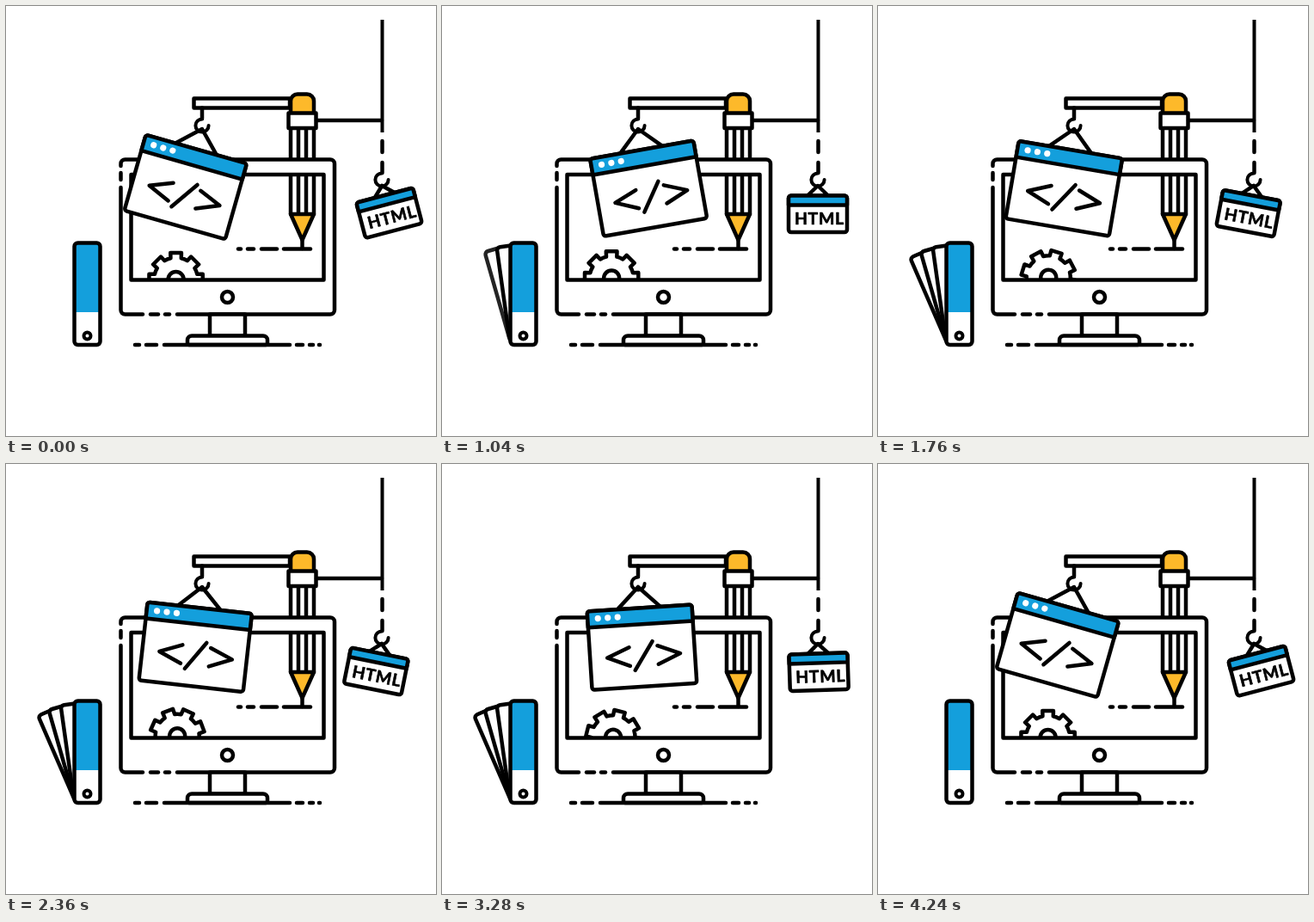
An HTML page with a canvas for the animation above (4.28 s loop, 500 px wide and 500 px high).

```html
<!DOCTYPE html>
<html lang="en">
<head>
<meta charset="utf-8">
<title>Web design crane</title>
<style>
html, body { margin: 0; width: 100%; height: 100%; overflow: hidden; background: #fff; }
canvas { display: block; width: 500px; height: 500px; }
</style>
</head>
<body>
<canvas id="stage" width="500" height="500"></canvas>
<script>
const ctx = document.getElementById('stage').getContext('2d');
const LOOP = 4280, STEP = 40;
const BLUE = '#149fdc', YELLOW = '#fdb92a', WHITE = '#fff', INK = '#000';
const WEIGHT = 4.5;
const RAD = Math.PI / 180;

const clamp = v => Math.max(0, Math.min(1, v));
const ramp = (t, a, b) => clamp((t - a) / (b - a));
const mix = (a, b, u) => a + (b - a) * u;
const soft = (u, k) => u - k * Math.sin(2 * Math.PI * u) / (2 * Math.PI);

function paint(fill, width = WEIGHT) {
  if (fill) { ctx.fillStyle = fill; ctx.fill(); }
  if (width) { ctx.lineWidth = width; ctx.stroke(); }
}

function line(...p) {
  ctx.beginPath();
  for (let i = 0; i < p.length; i += 2) ctx.lineTo(p[i], p[i + 1]);
  paint(null);
}

function box(x1, y1, x2, y2, r, fill, width) {
  ctx.beginPath();
  ctx.roundRect(x1, y1, x2 - x1, y2 - y1, r);
  paint(fill, width);
}

function disc(x, y, r, fill, width) {
  ctx.beginPath();
  ctx.arc(x, y, r, 0, 2 * Math.PI);
  paint(fill, width);
}

// Horizontal dashes given as start/end pairs
function dashes(y, ...x) {
  for (let i = 0; i < x.length; i += 2) line(x[i], y, x[i + 1], y);
}

function turned(x, y, deg, draw) {
  ctx.save();
  ctx.translate(x, y);
  ctx.rotate(deg * RAD);
  draw();
  ctx.restore();
}

function hook(x, y) {
  ctx.beginPath();
  ctx.arc(x, y, 7.6, -90 * RAD, 0, true);
  paint(null, 4);
}

function pencil() {
  box(331, 102.5, 358, 126, [8, 8, 0, 0], YELLOW);
  for (const x of [331, 340, 349, 358]) line(x, 142, x, 242);
  box(328.5, 124.5, 360.5, 142, 0, WHITE);
  ctx.beginPath();
  ctx.moveTo(331, 242);
  ctx.lineTo(358, 242);
  ctx.lineTo(344.5, 272);
  ctx.closePath();
  paint(YELLOW);
  line(344.5, 272, 344.5, 282);
  dashes(282.5, 270, 273, 281, 288, 297, 315, 323, 354);
}

function gear(a) {
  const b = (a + 120) * RAD;
  ctx.save();
  ctx.beginPath();
  ctx.rect(147, 198, 221, 120);
  ctx.clip();
  turned(198.2 + 1.2 * Math.cos(b), 317 + 1.2 * Math.sin(b), a, () => {
    ctx.beginPath();
    for (let i = 0; i < 8; i++) {
      const c = i * 45 - 90;
      for (const [d, r] of [[-14, 25.5], [-11.5, 31.8], [11.5, 31.8], [14, 25.5]]) {
        ctx.lineTo(r * Math.cos((c + d) * RAD), r * Math.sin((c + d) * RAD));
      }
      ctx.arc(0, 0, 25.5, (c + 14) * RAD, (c + 31) * RAD);
    }
    ctx.closePath();
    paint(WHITE);
    disc(0, 0, 9, WHITE);
  });
  ctx.restore();
}

function bezel() {
  ctx.beginPath();
  ctx.roundRect(133.5, 178.5, 248.5, 180, 5);
  ctx.rect(145.5, 196, 224, 122.5);
  ctx.fillStyle = WHITE;
  ctx.fill('evenodd');

  ctx.beginPath();
  ctx.moveTo(133.5, 186);
  ctx.arcTo(133.5, 178.5, 140, 178.5, 5);
  ctx.arcTo(382, 178.5, 382, 200, 5);
  ctx.arcTo(382, 358.5, 370, 358.5, 5);
  ctx.lineTo(199, 358.5);
  ctx.moveTo(133.5, 194);
  ctx.lineTo(133.5, 202);
  ctx.moveTo(133.5, 211);
  ctx.arcTo(133.5, 358.5, 145, 358.5, 5);
  ctx.lineTo(159, 358.5);
  paint(null);
  dashes(358.5, 168, 177, 185, 190);

  box(145.5, 196, 369.5, 318.5, 0, null);
  disc(257.5, 338.5, 6.5, WHITE);
}

function stand() {
  box(237, 358.5, 278, 383.5, 0, WHITE);
  box(211, 383.5, 304, 394, [5, 5, 2, 2], WHITE);
  dashes(394, 150, 155, 163, 175, 184, 330, 338, 345, 353, 357, 364, 365);
}

function crane() {
  box(218.5, 107.5, 330, 118.5, 0, WHITE);
  line(228, 118.5, 228, 131);
  ctx.lineCap = 'butt';
  ctx.beginPath();
  ctx.moveTo(437.5, 16);
  ctx.lineTo(437.5, 147);
  paint(null, 4);
  ctx.lineCap = 'round';
  line(361, 133, 437, 133);
  line(437.5, 157, 437.5, 170);
  line(437.5, 182, 437.5, 194);
}

function codeWindow(deg) {
  turned(228, 143, deg, () => {
    line(-26, 25, 0, 0, 25, 25);
    box(-61, 24.5, 61, 116, 3, WHITE);
    box(-61, 24.5, 61, 43.5, [3, 3, 0, 0], BLUE);
    for (const x of [-49, -37.5, -26]) disc(x, 33.5, 3.6, WHITE, 0);
    line(-15, 69.5, -41, 80, -15, 91);
    line(12.5, 64, -9.5, 96.5);
    line(18, 69.5, 44, 80, 18, 91);
  });
  hook(228, 139);
}

function sign(deg) {
  turned(437, 208, deg, () => {
    line(-12, 12.5, 0, 1, 12, 12.5);
    box(-34, 12.5, 34, 55, 3, WHITE);
    box(-34, 12.5, 34, 23.5, [3, 3, 0, 0], BLUE);
    ctx.font = 'bold 19.5px Lato, sans-serif';
    ctx.letterSpacing = '0.6px';
    ctx.textAlign = 'center';
    ctx.fillStyle = INK;
    ctx.fillText('HTML', 1.8, 46);
    ctx.lineWidth = 0.6;
    ctx.strokeText('HTML', 1.8, 46);
  });
  hook(437, 202);
}

function swatches(t) {
  const out = 1 - ramp(t, 3940, 4240);
  const fan = [[-23.5, 1080, 1640], [-16, 560, 1120], [-8, 0, 540]];
  for (const [deg, from, to] of fan) {
    ctx.globalAlpha = ramp(t, from, to) * out;
    turned(94.5, 383.5, deg, () => box(-16.3, -106, 8, 3, 4, WHITE));
  }
  ctx.globalAlpha = 1;
  box(79.5, 275.5, 109.5, 394, 4, WHITE, 0);
  box(79.5, 275.5, 109.5, 356, [4, 4, 0, 0], BLUE, 0);
  box(79.5, 275.5, 109.5, 394, 4, null);
  disc(94.5, 383.5, 4, WHITE, 4);
}

// Four one-second swings, then a short rest
function windowAngle(t) {
  const s = Math.min(t, 4000) / 1000 % 2;
  return mix(15.9, -11, soft(s < 1 ? s : 2 - s, 0.05));
}

function signAngle(t) {
  const u = t < 2080 ? t / 2080 : 1 - ramp(t, 2080, 4240);
  return mix(-14.7, 14.7, soft(u, 0.15));
}

function draw(t) {
  ctx.fillStyle = WHITE;
  ctx.fillRect(0, 0, 500, 500);
  ctx.strokeStyle = INK;
  ctx.lineCap = 'round';
  ctx.lineJoin = 'round';
  pencil();
  gear(360 * ramp(t, 0, 4160));
  bezel();
  stand();
  crane();
  codeWindow(windowAngle(t));
  sign(signAngle(t));
  swatches(t);
}

const start = performance.now();
function tick() {
  const t = (performance.now() - start) % LOOP;
  draw(Math.floor(t / STEP) * STEP);
  requestAnimationFrame(tick);
}
tick();
</script>
</body>
</html>
```
